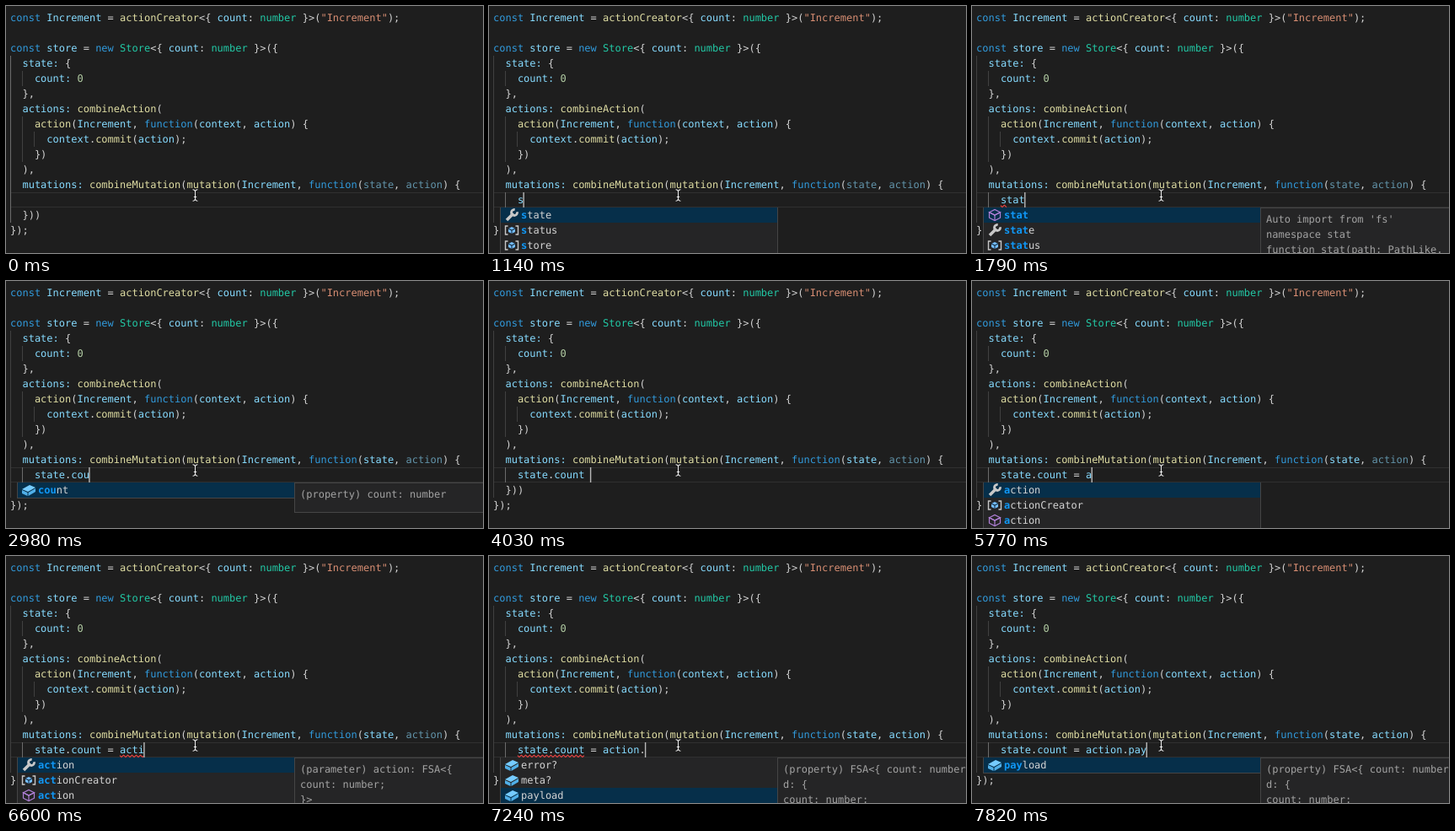
Animation of 566x293 px, one loop 8000 ms. Source, as an HTML page with a canvas:

```html
<!DOCTYPE html>
<html lang="en">
<head>
<meta charset="utf-8">
<title>Code editor typing</title>
<style>
  html, body { margin: 0; height: 100%; overflow: hidden; background: #1e1e1e; }
  canvas { display: block; }
</style>
</head>
<body>
<canvas id="stage" width="566" height="293"></canvas>
<script>
const ctx = document.getElementById('stage').getContext('2d');
const LOOP = 8000, LEFT = 5, TOP = 5, CHAR = 7.224, ROW = 18, EDIT_ROW = 12;
const FONT = '12px "DejaVu Sans Mono", monospace';
const COLOR = {
  keyword: '#319bdd', type: '#22c9a6', string: '#d88e73', number: '#b4cfa5',
  fn: '#dfdda3', name: '#86dbff', faded: '#6294aa', plain: '#d4d4d4'
};

const CODE = `const Increment = actionCreator<{ count: number }>("Increment");

const store = new Store<{ count: number }>({
  state: {
    count: 0
  },
  actions: combineAction(
    action(Increment, function(context, action) {
      context.commit(action);
    })
  ),
  mutations: combineMutation(mutation(Increment, function(state, action) {

  }))
});`.split('\n');

// Suggestion rows are [icon, label]
const STAT = [['cube', 'stat'], ['wrench', 'state'], ['variable', 'status']];
const STATE = [['wrench', 'state'], ['variable', 'status'], ['variable', 'store']];
const ACTION = [['wrench', 'action'], ['variable', 'actionCreator'], ['cube', 'action']];
const COUNT = [['field', 'count']];
const FIELDS = [['field', 'error?'], ['field', 'meta?'], ['field', 'payload']];

const STAT_INFO = ["Auto import from 'fs'", 'namespace stat', 'function stat(path: PathLike,'];
const STATE_INFO = ['(parameter) state: {', 'count: number;', '}'];
const COUNT_INFO = ['(property) count: number'];
const ACTION_INFO = ['(parameter) action: FSA<{', 'count: number;', '}>'];
const PAYLOAD_INFO = ['(property) FSA<{ count: number }>.payloa', 'd: {', 'count: number;'];

// Each step changes part of the state; squiggle is [row, column, length]
const STEPS = [
  [0, { text: '', caret: false, list: null, info: null, selected: 0, match: 0, squiggle: null, used: [] }],
  [180, { caret: true }],
  [660, { caret: false }],
  [1020, { text: 's', caret: true }],
  [1080, { list: STATE, match: 1 }],
  [1200, { info: STATE_INFO, squiggle: [12, 4, 1] }],
  [1370, { text: 'st' }],
  [1430, { list: STAT, match: 2, info: STAT_INFO }],
  [1550, { text: 'sta', match: 3 }],
  [1730, { text: 'stat' }],
  [1790, { match: 4 }],
  [1850, { text: 'state', list: STATE.slice(0, 1).concat(STAT.slice(2), STAT.slice(0, 1)), info: STATE_INFO, match: 5, squiggle: null }],
  [2210, { text: 'state.', list: null, info: null }],
  [2330, { list: COUNT, info: COUNT_INFO, match: 0, used: ['state'] }],
  [2740, { text: 'state.c', match: 1 }],
  [2920, { text: 'state.co', match: 2 }],
  [2980, { text: 'state.cou', match: 3 }],
  [3330, { text: 'state.coun' }],
  [3390, { match: 4 }],
  [3620, { text: 'state.count', match: 5 }],
  [3670, { list: null, info: null }],
  [4030, { text: 'state.count ' }],
  [4510, { text: 'state.count =' }],
  [4750, { text: 'state.count = ' }],
  [5110, { squiggle: [13, 2, 1] }],
  [5230, { caret: false }],
  [5650, { text: 'state.count = a', caret: true }],
  [5720, { list: ACTION, match: 1, squiggle: null }],
  [5790, { info: ACTION_INFO }],
  [5930, { squiggle: [12, 18, 1] }],
  [6000, { text: 'state.count = ac', match: 2, squiggle: [12, 18, 2] }],
  [6180, { text: 'state.count = act', squiggle: [12, 18, 3] }],
  [6240, { match: 3 }],
  [6600, { text: 'state.count = acti', squiggle: [12, 18, 4] }],
  [6660, { text: 'state.count = actio', match: 4, squiggle: [12, 18, 5] }],
  [6770, { text: 'state.count = action', match: 6 }],
  [6830, { squiggle: [12, 4, 11] }],
  [7190, { text: 'state.count = action.', list: null, info: null }],
  [7240, { list: FIELDS, info: PAYLOAD_INFO, selected: 2, match: 0, used: ['state', 'action'] }],
  [7540, { text: 'state.count = action.p' }],
  [7600, { list: FIELDS.slice(2), selected: 0, match: 1, squiggle: null }],
  [7720, { text: 'state.count = action.pa', match: 2 }],
  [7820, { text: 'state.count = action.pay', match: 3 }]
];

const columnX = column => LEFT + column * CHAR;
const rowY = row => TOP + row * ROW;

function rect(x, y, w, h, color) {
  ctx.fillStyle = color;
  ctx.fillRect(x, y, w, h);
}

function write(text, x, y, color, bold) {
  ctx.font = (bold ? 'bold ' : '') + FONT;
  ctx.fillStyle = color;
  ctx.fillText(text, x, y);
}

function path(points, color, { fill = false, width = 1.2, close = fill } = {}) {
  ctx.beginPath();
  points.forEach(([x, y]) => ctx.lineTo(x, y));
  if (close) ctx.closePath();
  ctx[fill ? 'fillStyle' : 'strokeStyle'] = color;
  ctx.lineWidth = width;
  fill ? ctx.fill() : ctx.stroke();
}

function tokenColor(token, line, end) {
  if (/^(const|new|function)$/.test(token)) return COLOR.keyword;
  if (/^(Store|number)$/.test(token)) return COLOR.type;
  if (token[0] === '"') return COLOR.string;
  if (/^\d/.test(token)) return COLOR.number;
  if (!/^\w/.test(token)) return COLOR.plain;
  return /[(<]/.test(line[end] || '') ? COLOR.fn : COLOR.name;
}

function drawLine(line, row, used) {
  for (const { 0: token, index } of line.matchAll(/"[^"]*"|(?<=^ +)\w+:|\w+|[^\w\s"]+/g)) {
    const faded = row === 11 && index > 50 && /^(state|action)$/.test(token) && !used.includes(token);
    const color = faded ? COLOR.faded : tokenColor(token, line, index + token.length);
    write(token, columnX(index), rowY(row) + 13, color);
  }
}

function drawGuides(typing) {
  const guide = (column, row, rows, active) =>
    rect(Math.floor(columnX(column)), rowY(row), 1, rows * ROW, active ? '#6b6b6b' : '#404040');
  guide(0, 3, 11, !typing);
  guide(2, 4, 1);
  guide(2, 7, 3);
  guide(4, 8, 1);
  if (typing) guide(2, EDIT_ROW, 1, true);
}

function drawSquiggle([row, column, length]) {
  const start = columnX(column), points = [];
  for (let x = 0; x <= length * CHAR; x += 0.5) {
    points.push([start + x, rowY(row) + 16.2 + Math.abs((x + 3) % 5 - 2.5)  - 1]);
  }
  path(points, '#ee4545', { width: 1.1 });
}

function cube(x, y, r, color, solid) {
  const h = r * 0.5;
  const top = [[x - r, y - h], [x, y - 2 * h], [x + r, y - h], [x, y]];
  const sides = [[x - r, y - h], [x - r, y + h], [x, y + 2 * h], [x + r, y + h], [x + r, y - h], [x, y]];
  path(top, color, { fill: solid, close: true });
  path(sides, color, { fill: solid, close: true });
  path([[x, y], [x, y + 2 * h]], solid ? '#1e3b50' : color);
  if (solid) path([[x - r, y - h], [x, y], [x + r, y - h]], '#1e3b50');
}

const ICONS = {
  cube: y => cube(27, y, 6.5, '#b180d7'),
  field(y) {
    path([[19, y - 1], [28, y - 6], [35, y - 3], [26, y + 2]], '#75cbff', { fill: true });
    path([[19, y], [25.5, y + 3], [25.5, y + 7], [19, y + 4]], '#50afe8', { fill: true });
    path([[26.5, y + 3], [35, y - 2], [35, y + 2], [26.5, y + 7]], '#50afe8', { fill: true });
  },
  wrench(y) {
    path([[21, y + 6], [29, y - 2]], '#c8c8c8', { width: 3.5 });
    ctx.beginPath();
    ctx.arc(30, y - 3, 3.5, -0.2, 4.9);
    ctx.lineWidth = 2.8;
    ctx.stroke();
  },
  variable(y) {
    for (const [x, d] of [[19.5, 3], [34.5, -3]]) {
      path([[x + d, y - 5], [x, y - 5], [x, y + 5], [x + d, y + 5]], '#c8c8c8', { width: 1.4 });
    }
    cube(27, y, 4, '#75beff', true);
  }
};

function drawList({ list, selected, match }) {
  const top = rowY(13);
  rect(13, top, 330, list.length * ROW + 1, '#454545');
  rect(14, top, 328, list.length * ROW, '#252526');
  list.forEach(([icon, label], i) => {
    const y = top + i * ROW;
    if (i === selected) rect(14, y, 328, ROW, '#062f4a');
    ICONS[icon](y + 9);
    write(label.slice(0, match), 38, y + 13, '#1098f7', true);
    write(label.slice(match), 38 + match * CHAR, y + 13, COLOR.plain);
  });
}

function drawInfo(lines) {
  const top = rowY(13), height = lines.length * ROW + 18;
  rect(342, top, 224, height, '#454545');
  rect(343, top + 1, 223, height - 2, '#252526');
  lines.forEach((line, i) => write(line, 349, top + 18 + i * ROW, '#a3a3a3'));
}

function drawPointer() {
  const beam = (color, width) => {
    path([[224.5, 219], [224.5, 230]], color, { width });
    path([[221.5, 217.8], [223, 218], [224.5, 219.5], [226, 218], [227.5, 217.8]], color, { width });
    path([[221.5, 231.2], [223, 231], [224.5, 229.5], [226, 231], [227.5, 231.2]], color, { width });
    path([[222.8, 226.5], [226.2, 226.5]], color, { width });
  };
  beam('#111', 2.6);
  beam('#eee', 1.1);
}

function draw(time) {
  const state = Object.assign({}, ...STEPS.filter(([at]) => at <= time).map(([, change]) => change));
  rect(0, 0, 566, 293, '#1e1e1e');
  const y = rowY(EDIT_ROW);
  rect(LEFT, y, 561, 1, '#303030');
  rect(LEFT, y + ROW - 1, 561, 1, '#303030');
  drawGuides(state.text !== '');
  CODE.forEach((line, row) => drawLine(row === EDIT_ROW ? '    ' + state.text : line, row, state.used));
  if (state.squiggle) drawSquiggle(state.squiggle);
  if (state.caret) rect(columnX(4 + state.text.length) - 0.7, y, 1.4, ROW, '#b8b8b8');
  if (state.list) drawList(state);
  if (state.info) drawInfo(state.info);
  drawPointer();
}

ctx.textRendering = 'geometricPrecision';
const start = performance.now();
function frame() {
  draw((performance.now() - start) % LOOP);
  requestAnimationFrame(frame);
}
frame();
</script>
</body>
</html>
```
